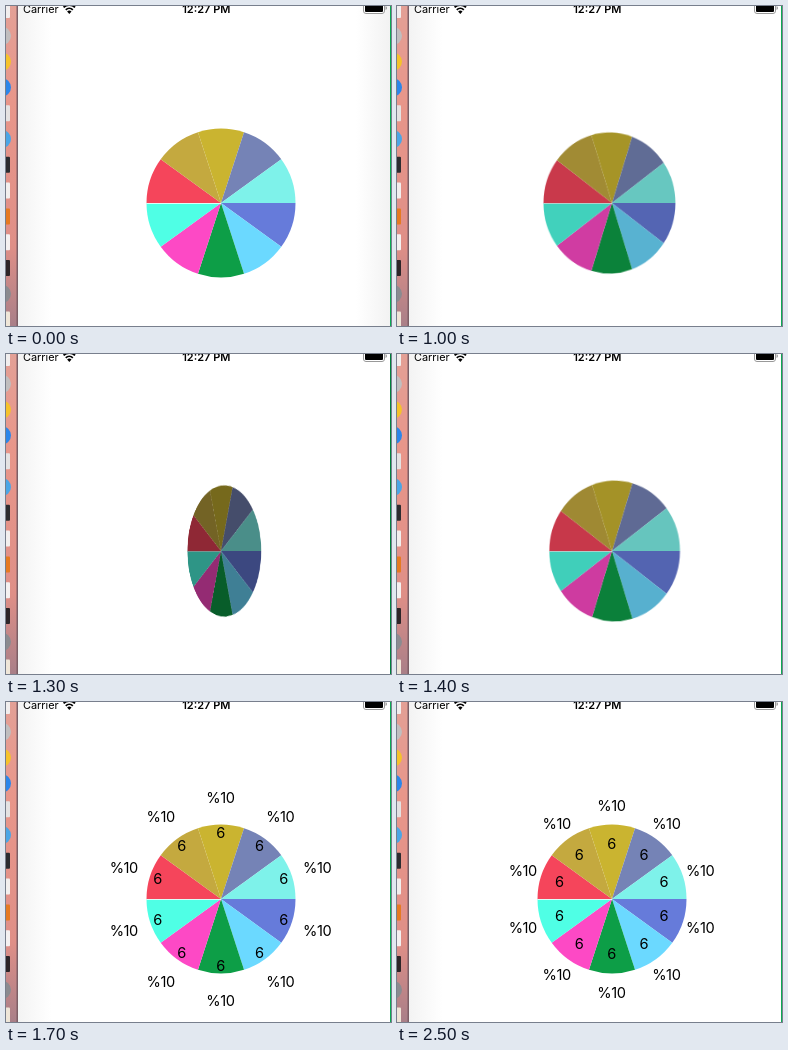
Recreate the animation shown at these times as an HTML page. Size 385x320 px, loop 2.9 s.

```html
<!DOCTYPE html>
<html lang="en">
<head>
<meta charset="utf-8">
<title>Pie flip</title>
<style>
html, body { margin: 0; width: 100%; height: 100%; overflow: hidden; background: #fff; }
#stage { position: relative; width: 385px; height: 320px; overflow: hidden; background: #fff; }
#stage > * { position: absolute; }
#screen { left: 0; top: 0; }
#pie { left: 102px; top: 84px; width: 226px; height: 226px; overflow: hidden; }
text { font-family: Inter, "Liberation Sans", sans-serif; }
#labels text { font-size: 14.6px; letter-spacing: -.4px; text-anchor: middle; }
</style>
</head>
<body>
<div id="stage">
  <svg id="screen" width="385" height="320">
    <defs>
      <linearGradient id="desk" x2="0" y2="1">
        <stop stop-color="#e3a096"/>
        <stop offset=".3" stop-color="#e8968a"/>
        <stop offset=".75" stop-color="#df8f87"/>
        <stop offset="1" stop-color="#a97f88"/>
      </linearGradient>
      <linearGradient id="shadeL"><stop stop-color="#f3f3f3"/><stop offset="1" stop-color="#fff"/></linearGradient>
      <linearGradient id="shadeR"><stop stop-color="#fff"/><stop offset="1" stop-color="#f2f2f2"/></linearGradient>
    </defs>
    <rect x="12" width="34" height="320" fill="url(#shadeL)"/>
    <rect id="right" x="350" width="34" height="320" fill="url(#shadeR)"/>
    <rect width="11" height="320" fill="url(#desk)"/>
    <g id="dock"></g>
    <rect x="10.5" width="1.5" height="320" fill="#7d5f66"/>
    <rect id="edge" x="384" width="1" height="320"/>
    <text x="17" y="7" font-size="10.9">Carrier</text>
    <g fill="none" stroke="#000" stroke-width="1.8">
      <path d="M57.6 1.4a8.2 8.2 0 0 1 11.4 0M59.8 3.8a5 5 0 0 1 7 0"/>
      <path d="M63.3 8l-2.2-2.4a3.2 3.2 0 0 1 4.4 0z" fill="#000" stroke="none"/>
    </g>
    <text x="200.3" y="7" font-size="11" font-weight="600" text-anchor="middle">12:27 PM</text>
    <rect x="357.5" y="-3.5" width="21" height="11" rx="2.5" fill="#fff" stroke="#999"/>
    <rect x="359" y="-2" width="18" height="8" rx="1"/>
    <path d="M379.5 0v4q1.5-.6 1.5-2t-1.5-2" fill="#999"/>
  </svg>
  <svg id="pie" viewBox="-113 -113 226 226">
    <g id="slices"></g>
    <path d="M-74.5 .5H0" stroke="#fff" opacity=".8"/>
    <g id="labels"></g>
  </svg>
</div>
<script>
const LOOP = 2900, RADIUS = 74.5, SLICE = Math.PI / 5;
const COLORS = ['#667bda', '#6bd9ff', '#0d9e47', '#fd49c5', '#4fffe5',
                '#f5455b', '#c4a93f', '#cab430', '#7583b6', '#7ef2ea'];
const DOCK = ['#f1eeee', '#c0bebf', '#f5c22b', '#2b86ea', '#e4e2e2', '#4ba6e6', '#2c2c30',
              '#f2efee', '#e57a22', '#f4f1f1', '#2d2528', '#8b8b90', '#efe6d8'];
// Flip angle in degrees, every 100 ms from 800 ms on
const FLIP = [0, 3, 21, 51, 88, 124, 158, 180];

const $ = id => document.getElementById(id);

function add(parent, tag, attrs) {
  const el = document.createElementNS('http://www.w3.org/2000/svg', tag);
  for (const k in attrs) el.setAttribute(k, attrs[k]);
  return parent.appendChild(el);
}

DOCK.forEach((fill, i) => {
  const y = 4 + i * 25.8;
  if ([1, 2, 3, 5, 11].includes(i)) add($('dock'), 'circle', { cx: -4, cy: y, r: 9, fill });
  else add($('dock'), 'rect', { x: -10, y: y - 8, width: 14, height: 16, rx: 1, fill });
});

const at = (a, r) => [r * Math.cos(a), r * Math.sin(a)];

const labels = COLORS.map((fill, i) => {
  const a = i * SLICE;
  add($('slices'), 'path', {
    d: `M0 0L${at(a, RADIUS)}A${RADIUS} ${RADIUS} 0 0 1 ${at(a + SLICE, RADIUS)}Z`, fill
  });
  const value = add($('labels'), 'text', {}), share = add($('labels'), 'text', {});
  value.textContent = '6';
  share.textContent = '%10';
  return { mid: a + SLICE / 2, value, share };
});

function place(el, angle, r) {
  const [x, y] = at(angle, r);
  el.setAttribute('x', x - 0.5);
  el.setAttribute('y', y + 5.4);
}

// The picture holds between these moments
function hold(t) {
  if (t < 800) return 0;
  if (t >= 2500) return 2500;
  if (t >= 2100 && t < 2400) return 2100;
  return Math.floor(t / 100) * 100;
}

function draw(t) {
  const deg = t < 800 ? 0 : FLIP[Math.min((t - 800) / 100, FLIP.length - 1)];
  const s = Math.sin(deg * Math.PI / 180);
  const flat = deg === 0 || deg === 180;
  const face = deg > 90 ? deg - 180 : deg;
  $('pie').style.transform = flat ? 'none'
    : `perspective(690px) scale(${1 - 0.148 * s}) rotateY(${face}deg)`;
  $('pie').style.filter = flat ? 'none' : `brightness(${1 - 0.5 * s})`;
  $('edge').setAttribute('fill', s > 0.5 ? '#00823c' : '#0cab54');
  $('right').style.display = t < 800 ? '' : 'none';

  const shown = t >= 1400;
  $('labels').style.display = shown ? '' : 'none';
  if (!shown) return;
  const off = t >= 2500 ? 0 : 2 * Math.exp((1900 - t) / 116);
  for (const { mid, value, share } of labels) {
    place(value, mid, 55 + off);
    place(share, mid, 93.3 + off * 0.75);
  }
}

const start = performance.now();
let last = -1;
function tick() {
  const t = hold((performance.now() - start) % LOOP);
  if (t !== last) draw(last = t);
  requestAnimationFrame(tick);
}
tick();
</script>
</body>
</html>
```
